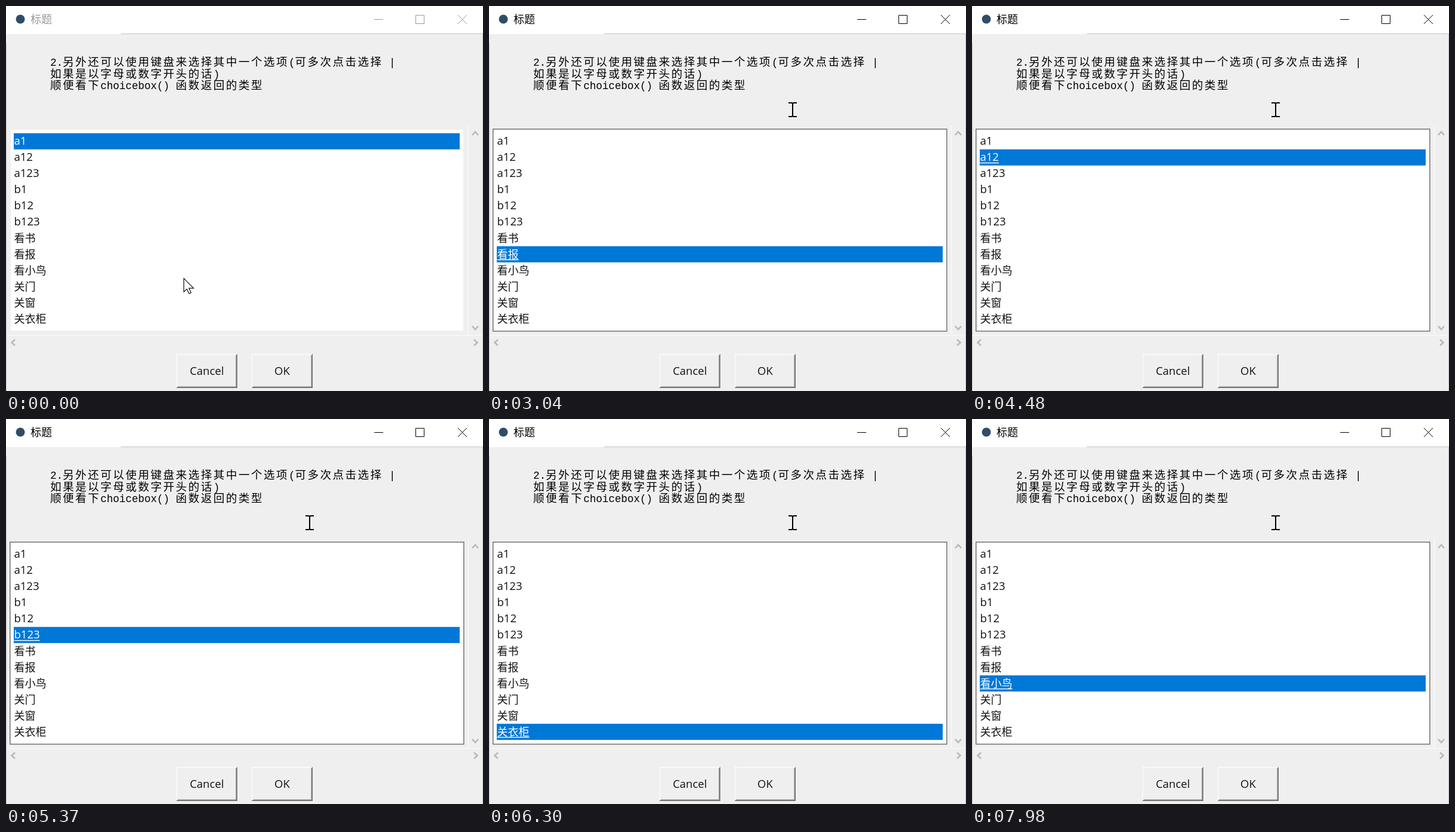
Animation, 798 px wide and 644 px high, one loop 8 s. Source, as an HTML page:

```html
<!DOCTYPE html>
<html lang="zh-CN">
<head>
<meta charset="utf-8">
<title>标题</title>
<style>
  html, body { margin: 0; width: 100%; height: 100%; overflow: hidden; background: #efefef; }
  svg { display: block; width: 100vw; height: 100vh; }
  text { font: 18.5px "Open Sans", "Noto Sans CJK SC", "Noto Sans CJK", sans-serif; fill: #111; white-space: pre; }
  .cjk { font-family: "Noto Sans CJK SC", "Noto Sans CJK", sans-serif; font-size: 18px; }
  .msg { font: 18.5px "Noto Sans CJK SC", "Noto Sans CJK", sans-serif; letter-spacing: 2.5px; fill: #000; }
  .msg .mono { font: 17.5px "Liberation Mono", monospace; letter-spacing: 0; }
  .on { fill: #fff; }
  .line { fill: none; }
</style>
</head>
<body>
<svg id="stage" viewBox="0 0 798 644" xmlns="http://www.w3.org/2000/svg">
  <rect width="798" height="644" fill="#efefef"/>
  <rect width="798" height="46" fill="#fff"/>
  <rect y="46" width="192" height="1" fill="#fff"/>
  <rect x="192" y="46" width="606" height="1" fill="#c4c4c4"/>
  <rect y="62" width="1" height="582" fill="#c8c8c8"/>
  <rect x="797" y="46" width="1" height="598" fill="#c8c8c8"/>
  <circle cx="24" cy="22" r="7.5" fill="#2f4d66"/>
  <text id="title" class="cjk" x="41" y="29.3">标题</text>
  <path id="controls" class="line" d="M616 22.5H631M685.5 15.5H699.5V29.5H685.5ZM756 15L771 30M771 15L756 30"/>

  <g id="message"></g>

  <path class="line" stroke="#f9f9f9" stroke-width="1.5" d="M773.5 200V550M1 551H797"/>
  <path class="line" stroke="#b9b9b9" stroke-width="2.6"
    d="M780 216L785 210.5L790 216M780 535.5L785 541L790 535.5M15 558L9.5 563L15 568M783 558L788.5 563L783 568"/>

  <rect x="8" y="207" width="757" height="336" fill="#fff"/>
  <rect id="border" class="line" x="6.7" y="205.9" width="759.2" height="338" stroke="#6c6c6c" stroke-width="1.4"/>
  <rect id="bar" x="13" width="746" height="27" fill="#0078d7"/>
  <g id="list"></g>
  <rect id="underline" x="13.5" height="1.4" fill="#fff"/>
  <g id="buttons"></g>

  <path id="arrow" d="M.5 .7V23.2L5.6 18.4L9.3 26.3L12.6 24.8L9.1 17.1H16.8Z"
    fill="#fff" stroke="#111" stroke-width="1.2"/>
  <path id="beam" class="line" stroke="#000" stroke-width="2"
    d="M-7 -11.5H-2Q0 -11.5 0 -9.5Q0 -11.5 2 -11.5H7M0 -10V10M-7 11.5H-2Q0 11.5 0 9.5Q0 11.5 2 11.5H7"/>
</svg>
<script>
const LOOP = 8000, CLICK = 790, ROW = 27, BAR_TOP = 212.8, LIST_TOP = 205;
const $ = id => document.getElementById(id);

function add(parent, tag, attrs, text) {
  const node = document.createElementNS("http://www.w3.org/2000/svg", tag);
  for (const key in attrs) node.setAttribute(key, attrs[key]);
  if (text) node.textContent = text;
  parent.appendChild(node);
  return node;
}

// Half-width runs use the monospaced face.
const lines = [
  "2.另外还可以使用键盘来选择其中一个选项(可多次点击选择 |",
  "如果是以字母或数字开头的话)",
  "顺便看下choicebox() 函数返回的类型"
];
lines.forEach((line, i) => {
  const text = add($("message"), "text", { class: "msg", x: 74, y: 100 + i * 19.6 });
  for (const run of line.match(/[ -~]+|[^ -~]+/g))
    add(text, "tspan", /[ -~]/.test(run) ? { class: "mono" } : {}, run);
});

const items = ["a1", "a12", "a123", "b1", "b12", "b123", "看书", "看报", "看小鸟", "关门", "关窗", "关衣柜"];
const rows = items.map((item, i) => {
  const cjk = item > "z";
  return add($("list"), "text", { class: cjk ? "cjk" : "", x: 13.5, y: (cjk ? 232.8 : 232.3) + i * ROW }, item);
});

function button(x, label) {
  const g = add($("buttons"), "g", { transform: `translate(${x} 582)` });
  add(g, "path", { d: "M0 57V0H102L100.6 1.4H1.4V55.6Z", fill: "#fcfcfc" });
  add(g, "path", { d: "M0 57H102V0L99.2 2.8V54.2H2.8Z", fill: "#a0a0a0" });
  add(g, "path", { d: "M0 57H102V0L100.6 1.4V55.6H1.4Z", fill: "#6b6b6b" });
  add(g, "text", { x: 51, y: 34.5, "text-anchor": "middle" }, label);
}
button(285, "Cancel");
button(411, "OK");

// Click, then arrow keys: [time, selected row]
const picks = [
  [0, 0], [CLICK, 7],
  [3640, 6], [3810, 5], [3970, 4], [4110, 3], [4300, 2], [4440, 1],
  [4810, 2], [4980, 3], [5140, 4], [5300, 5], [5460, 6], [5590, 7],
  [5740, 8], [5900, 9], [6060, 10], [6220, 11],
  [7280, 10], [7470, 9], [7610, 8]
];

// Pointer hot spot: [time, x, y]
const moves = [
  [0, 297, 455], [170, 297, 455], [470, 243, 361], [650, 241, 403],
  [1850, 241, 403], [2220, 496, 151], [2380, 508, 173.5], [LOOP, 508, 173.5]
];

const ease = u => u * u * (3 - 2 * u);

function pointer(t) {
  const i = moves.findIndex(m => m[0] > t);
  const [t0, x0, y0] = moves[i - 1], [t1, x1, y1] = moves[i];
  const u = ease((t - t0) / (t1 - t0));
  return [x0 + (x1 - x0) * u, y0 + (y1 - y0) * u];
}

function show(id, visible) {
  $(id).style.display = visible ? "" : "none";
}

function draw(t) {
  const active = t >= CLICK;
  const row = picks.filter(p => p[0] <= t).pop()[1];
  const top = BAR_TOP + row * ROW;
  $("title").style.fill = active ? "#000" : "#999";
  $("controls").style.stroke = active ? "#000" : "#999";
  show("border", active);
  show("underline", active);
  $("bar").setAttribute("y", top);
  $("underline").setAttribute("y", top + 22);
  $("underline").setAttribute("width", rows[row].getComputedTextLength());
  rows.forEach((text, i) => text.classList.toggle("on", i === row));

  const [x, y] = pointer(t), inList = y > LIST_TOP;
  show("arrow", inList);
  show("beam", !inList);
  $(inList ? "arrow" : "beam").setAttribute("transform", `translate(${x} ${y})`);
}

const start = performance.now();
function tick() {
  draw((performance.now() - start) % LOOP);
  requestAnimationFrame(tick);
}
tick();
</script>
</body>
</html>
```
